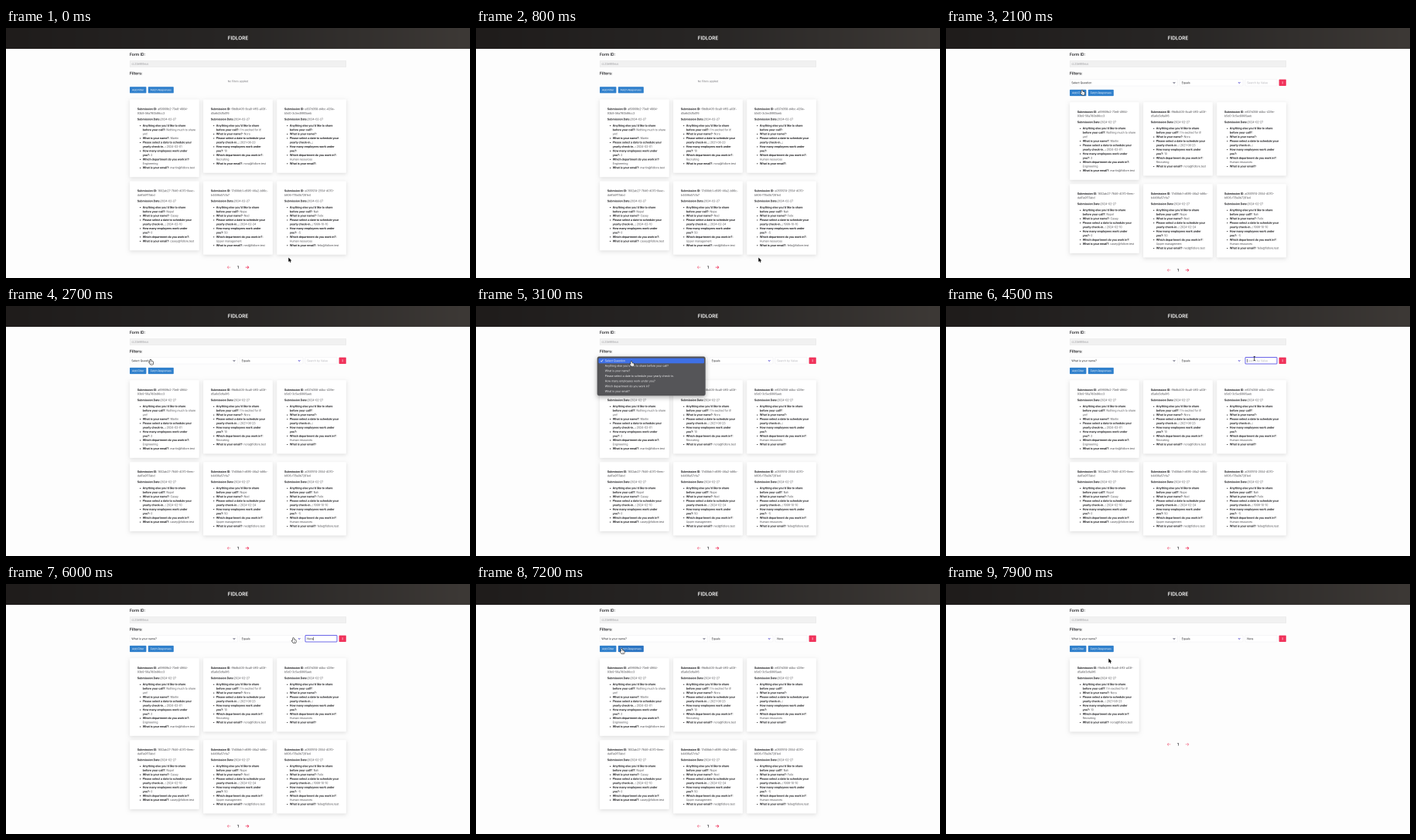
Animation of 600x324 px, one loop 8000 ms. Source, as an HTML page with a canvas:

```html
<!DOCTYPE html>
<html lang="en">
<head>
<meta charset="utf-8">
<title>Form responses</title>
<style>
  html, body { margin: 0; width: 100%; height: 100%; overflow: hidden; background: #fdfdfd; }
  canvas { display: block; width: 600px; height: 324px; }
</style>
</head>
<body>
<canvas id="stage"></canvas>
<script>
const W = 600, H = 324, LOOP = 8000, STEP = 100;
const LINE = 5.47, GAP = 5.3, CARD_W = 89.8;
const BODY = 3.5, INK = '#1f1f22', SOFT = '#4a4a4e';

const stage = document.getElementById('stage');
const view = stage.getContext('2d');
const dpr = window.devicePixelRatio || 1;
stage.width = W * dpr;
stage.height = H * dpr;

// The page is drawn large and scaled down, so tiny text stays smooth
const ZOOM = 4;
const sheet = document.createElement('canvas');
sheet.width = W * ZOOM;
sheet.height = H * ZOOM;
const ctx = sheet.getContext('2d');
ctx.scale(ZOOM, ZOOM);

const people = [
  { id: ['a69909b2-73e8-4984-', '93b9-56a780b86cc3'], call: ['Nothing much to share', 'yet!'],
    name: 'Martin', date: '2024-02-01', staff: '2', dept: 'Engineering' },
  { id: ['f9b8b405-8ca8-4ff3-a03f-', 'd5a6d3dfa0f6'], call: ["I'm excited for it!"],
    name: 'Nora', date: '2021-08-23', staff: '10', dept: 'Recruiting' },
  { id: ['e837d358-d4bc-429e-', 'b5d0-3c5ed9905aeb'], call: [''],
    name: '', date: '', staff: '', dept: 'Human resources' },
  { id: ['1602ab27-7846-4070-8eec-', 'da61a9117abd'], call: ['Nope!'],
    name: 'Casey', date: '2024-02-10', staff: '0', dept: '' },
  { id: ['17d08db1-d695-46a2-b86c-', 'b4486a57cfa7'], call: ['Nope'],
    name: 'Ned', date: '2024-02-24', staff: '50', dept: 'Upper management' },
  { id: ['a0551974-2554-4070-', 'b606-f78a0b7281e4'], call: ['Nah'],
    name: 'Felix', date: '1999-10-10', staff: '-5', dept: 'Human resources' }
];

const options = ['Select Question', "Anything else you'd like to share before your call?",
  'What is your name?', 'Please select a date to schedule your yearly check-in.',
  'How many employees work under you?', 'Which department do you work in?', 'What is your email?'];

// Pointer tip: time, x, y
const path = [
  [0, 365.3, 297.5], [800, 365.3, 297.5], [900, 329, 257], [1100, 258, 176],
  [1400, 197, 103], [1800, 176, 80.5], [2400, 176, 80.5], [2700, 187, 69.5],
  [3000, 188, 70], [3400, 240, 78], [3700, 278.5, 81.8], [3900, 279, 82],
  [4200, 383, 69], [4500, 398.8, 68], [5900, 398.8, 68], [6300, 290, 76],
  [6700, 188.5, 84], [7500, 188.5, 84], [7700, 203, 92], [7900, 210.3, 96.5], [8000, 210.3, 96.5]
];

function pointerAt(t) {
  const i = Math.max(1, path.findIndex(p => p[0] > t));
  const [t0, x0, y0] = path[i - 1], [t1, x1, y1] = path[i];
  const k = (t - t0) / (t1 - t0);
  return [x0 + (x1 - x0) * k, y0 + (y1 - y0) * k];
}

// Sets the font at ten times its size to keep fine glyph spacing; returns the width
function text(str, x, y, { size = BODY, weight = 400, color = INK, align = 'left' } = {}) {
  ctx.save();
  ctx.translate(x, y + size * 0.36);
  ctx.scale(0.1, 0.1);
  ctx.font = `${weight} ${size * 10}px Inter, "Liberation Sans", sans-serif`;
  ctx.textAlign = align;
  ctx.fillStyle = color;
  ctx.fillText(str, 0, 0);
  const width = ctx.measureText(str).width / 10;
  ctx.restore();
  return width;
}

function pair(label, value, x, y) {
  const w = label ? text(label, x, y, { weight: 700 }) : 0;
  text(value, x + w, y, { color: SOFT });
}

function box(x, y, w, h, r, fill, stroke, lw = 0.4) {
  ctx.beginPath();
  ctx.roundRect(x, y, w, h, r);
  if (fill) { ctx.fillStyle = fill; ctx.fill(); }
  if (stroke) { ctx.strokeStyle = stroke; ctx.lineWidth = lw; ctx.stroke(); }
}

function shadowBox(blur, drop, alpha, drawBox) {
  ctx.save();
  ctx.shadowColor = `rgba(0,0,0,${alpha})`;
  ctx.shadowBlur = blur * ZOOM;
  ctx.shadowOffsetY = drop * ZOOM;
  drawBox();
  ctx.restore();
}

function line(points, color, width) {
  ctx.beginPath();
  points.forEach(([x, y]) => ctx.lineTo(x, y));
  ctx.strokeStyle = color;
  ctx.lineWidth = width;
  ctx.stroke();
}

// Each row: bullet, bold part, plain part
function rows(p) {
  const mail = p.name && ` ${p.name.toLowerCase()}@fidlore.test`;
  return [
    [1, "Anything else you'd like to share", ''],
    [0, 'before your call?:', ' ' + p.call[0]],
    ...p.call.slice(1).map(s => [0, '', s]),
    [1, 'What is your name?:', ' ' + p.name],
    [1, 'Please select a date to schedule your', ''],
    [0, 'yearly check-in..:', ' ' + p.date],
    [1, 'How many employees work under', ''],
    [0, 'you?:', ' ' + p.staff],
    [1, 'Which department do you work in?:', ''],
    ...(p.dept ? [[0, '', p.dept]] : []),
    [1, 'What is your email?:', mail]
  ];
}

function card(p, x, y) {
  const list = rows(p);
  const h = 46 + (list.length - 1) * LINE;
  shadowBox(5, 1.4, 0.12, () => box(x, y, CARD_W, h, 1, '#fff'));
  pair('Submission ID:', ' ' + p.id[0], x + 9.8, y + 12.5);
  pair('', p.id[1], x + 9.8, y + 17.9);
  pair('Submission Date:', '2024-02-27', x + 9.8, y + 25.7);
  list.forEach(([dot, label, value], i) => {
    const ly = y + 33.9 + i * LINE;
    if (dot) {
      ctx.beginPath();
      ctx.arc(x + 13.6, ly + 0.2, 0.62, 0, 7);
      ctx.fillStyle = INK;
      ctx.fill();
    }
    pair(label, value, x + 16.7, ly);
  });
  return y + h;
}

function arrow(x, y, dir, color) {
  line([[x - 2.1 * dir, y], [x + 2.1 * dir, y]], color, 0.75);
  line([[x + 0.4 * dir, y - 1.7], [x + 2.1 * dir, y], [x + 0.4 * dir, y + 1.7]], color, 0.75);
}

function pager(y, single) {
  arrow(288.3, y, -1, '#f58ba0');
  text('1', 300, y, { size: 4.8, weight: 600, align: 'center' });
  arrow(311.8, y, 1, single ? '#f58ba0' : '#f0335b');
}

function chevron(x, y, color) {
  line([[x - 1.3, y - 0.7], [x, y + 0.7], [x + 1.3, y - 0.7]], color, 0.65);
}

function button(label, x, y, w, color) {
  box(x, y, w, 8.2, 0.9, color);
  text(label, x + w / 2, y + 4.1, { size: 3.35, color: '#fff', align: 'center' });
}

function header() {
  const g = ctx.createLinearGradient(0, 0, W, 0);
  g.addColorStop(0, '#1f1c1b');
  g.addColorStop(0.5, '#282625');
  g.addColorStop(1, '#3d3936');
  ctx.fillStyle = g;
  ctx.fillRect(0, 0, W, 27);
  text('FIDLORE', 300, 13, { size: 6.4, weight: 600, color: '#fff', align: 'center' });
}

function filterRow(question, typed, focus) {
  const y = 66.6, h = 8.4, mid = 70.9;
  box(160.2, y, 139.2, h, 0.8, '#fff', '#ededf0');
  text(question, 162.3, mid);
  chevron(295, mid, '#333350');
  box(302.6, y, 81.4, h, 0.8, '#fff', '#ededf0');
  text('Equals', 304.7, mid);
  chevron(379.2, mid, '#4338ca');
  box(387, y, 41, h, 0.8, '#fff', focus ? '#5a55e6' : '#ededf0', focus ? 0.9 : 0.4);
  const w = typed ? text(typed, 389.3, mid) : 0;
  if (!typed) text('Search by Value', 389.3, mid, { color: '#b4b4ba' });
  if (focus) line([[389.5 + w, mid - 2.2], [389.5 + w, mid + 2.2]], '#222', 0.5);
  box(430.6, y, 9.2, h, 0.8, '#f0335b');
  line([[435.2, 69.3], [435.2, 72.5]], '#fbb6c4', 0.9);
}

function menu(hover) {
  shadowBox(6, 2, 0.3, () => box(156.8, 65.6, 139.8, 50.6, 2.4, '#555558', '#77777a', 0.4));
  box(158.4, 67.6 + hover * 6.6, 136.6, 6.7, 1.2, '#3f70e6');
  options.forEach((s, i) => text(s, 166.7, 70.9 + i * 6.6, { color: '#f2f2f3' }));
  line([[161.3, 71], [162.3, 72.2], [164.2, 69.6]], '#fff', 0.6);
}

function arrowPointer(x, y) {
  const shape = [[0, 0], [0, 5.6], [1.3, 4.4], [2.2, 6.5], [3.1, 6.1], [2.2, 4.1], [4, 4]];
  ctx.beginPath();
  shape.forEach(([dx, dy]) => ctx.lineTo(x + dx, y + dy));
  ctx.closePath();
  ctx.lineJoin = 'round';
  ctx.strokeStyle = '#fff';
  ctx.lineWidth = 0.9;
  ctx.stroke();
  ctx.fillStyle = '#000';
  ctx.fill();
}

function hand(x, y) {
  ctx.beginPath();
  ctx.roundRect(x - 0.7, y, 1.4, 5, 0.7);
  ctx.roundRect(x - 0.7, y + 2.3, 4, 4, 1.1);
  ctx.moveTo(x - 0.7, y + 5.4);
  ctx.lineTo(x - 2, y + 3.6);
  ctx.lineTo(x - 1.3, y + 3.1);
  ctx.lineTo(x + 0.4, y + 4.4);
  ctx.closePath();
  ctx.lineJoin = 'round';
  ctx.strokeStyle = '#111';
  ctx.lineWidth = 1.1;
  ctx.stroke();
  ctx.fillStyle = '#fff';
  ctx.fill();
  for (const dx of [0.8, 2]) line([[x + dx, y + 3.8], [x + dx, y + 5.6]], '#333', 0.3);
}

function beam(x, y) {
  line([[x - 1.2, y - 2.9], [x, y - 2.4], [x + 1.2, y - 2.9]], '#111', 0.6);
  line([[x, y - 2.5], [x, y + 2.5]], '#111', 0.7);
  line([[x - 1.2, y + 2.9], [x, y + 2.4], [x + 1.2, y + 2.9]], '#111', 0.6);
}

function pointer(t) {
  if (t >= 5200 && t < 5900) return;
  const [x, y] = pointerAt(t);
  const onButton = x > 160 && x < 217 && y > 76 && y < 88.5;
  const inRow = t >= 2100 && y > 66.5 && y < 75.5;
  if (inRow && x > 387 && x < 428) beam(x, y);
  else if (onButton || inRow && x < 384 || t >= 2900 && t < 3900) hand(x, y);
  else arrowPointer(x, y);
}

function draw(t) {
  const open = t >= 2100, done = t >= 7500;
  const shift = open ? 3.7 : 0;
  const top = 92.5 + shift;
  const chosen = t >= 3900;
  const typed = 'Nora'.slice(0, [5200, 5400, 5500, 5700].filter(k => t >= k).length);

  ctx.fillStyle = '#fdfdfd';
  ctx.fillRect(0, 0, W, H);
  header();
  text('Form ID:', 160, 34.3, { size: 4.95, weight: 600 });
  box(160.2, 42.4, 279.6, 8.3, 0.6, '#f1f1f1', '#e6e6e6');
  text('cLZdeM4eus', 162.5, 46.6, { color: '#9a9a9e' });
  text('Filters:', 160, 58.6, { size: 4.95, weight: 600 });

  if (open) filterRow(options[chosen ? 2 : 0], typed, t >= 4500 && t < 6900);
  else text('No filters applied', 300, 69.1, { size: 3.3, color: '#77777c', align: 'center' });

  const over = t >= 6700 && t < 7700;
  button('Add Filter', 160, 76.2 + shift, 21.4, '#3080cc');
  button('Fetch Responses', 183.8, 76.2 + shift, 33, over ? '#2b74c2' : '#3080cc');

  if (done) {
    pager(card(people[1], 160, top) + 16.4, true);
  } else {
    let y = top, bottom;
    for (let r = 0; r < 2; r++) {
      const ends = people.slice(r * 3, r * 3 + 3)
        .map((p, i) => card(p, 160 + i * (CARD_W + GAP), y));
      bottom = Math.max(...ends);
      y = bottom + GAP;
    }
    pager(bottom + 16.4, false);
  }

  if (t >= 2900 && t < 3900) {
    const py = pointerAt(t)[1];
    menu(Math.max(0, Math.min(6, Math.floor((py - 67.6) / 6.6))));
  }
  pointer(t);

  view.imageSmoothingQuality = 'high';
  view.drawImage(sheet, 0, 0, stage.width, stage.height);
}

let shown = -1;
function tick(now) {
  const t = Math.floor(now % LOOP / STEP) * STEP;
  if (t !== shown) draw(shown = t);
  requestAnimationFrame(tick);
}
requestAnimationFrame(tick);
</script>
</body>
</html>
```
